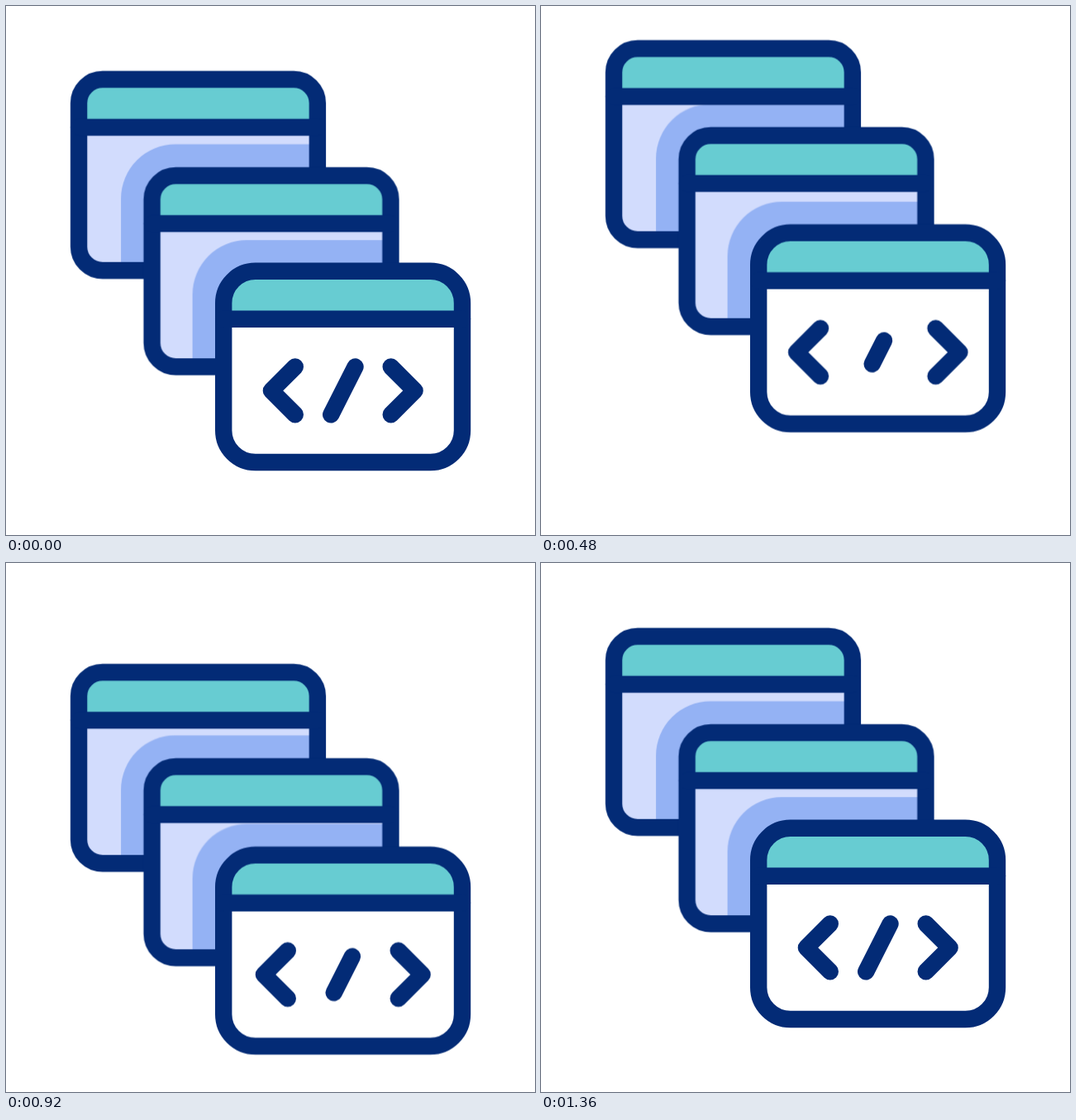
Animation, 640 px wide and 640 px high, one loop 1400 ms. Source, as an HTML page:

```html
<!DOCTYPE html>
<html lang="en">
<head>
<meta charset="utf-8">
<title>Code windows</title>
<style>
  html, body { margin: 0; width: 100%; height: 100%; overflow: hidden; background: #fff; }
  svg { display: block; width: 100vw; height: 100vh; }

  .line { fill: none; stroke: #032b76; stroke-width: 20.4; stroke-linecap: round; stroke-linejoin: round; }
  .head { fill: #67ccd2; }
  .body { fill: #d2dcfd; }
  .shade { fill: #94b2f4; }
  .white { fill: #fff; }

  .bob, .left, .right, .slash {
    animation: bob 1400ms cubic-bezier(.5, 0, .5, 1) infinite;
  }
  /* each window follows the one in front 80 ms later */
  .front { --up: -64px; --down: 43.5px; }
  .mid   { --up: -50px; --down: 43.5px; animation-delay: -1320ms; }
  .back  { --up: -38px; --down: 43.5px; animation-delay: -1240ms; }
  /* cancel the parent's motion so a shadow follows the window in front */
  .undo.mid  { --up: 50px; --down: -43.5px; }
  .undo.back { --up: 38px; --down: -43.5px; }

  .left  { --out: -13.8px; animation-name: spread; }
  .right { --out: 13.8px; animation-name: spread; }
  .slash { stroke-dasharray: 1 3; animation-name: trim; }

  @keyframes bob {
    0%, 2.143% { transform: translateY(0); }
    25.714% { transform: translateY(var(--up)); }
    54.286% { transform: translateY(var(--down)); }
    85.714%, 100% { transform: translateY(0); }
  }
  @keyframes spread {
    0%, 2.857% { transform: translateX(0); }
    47.143% { transform: translateX(var(--out)); }
    91.429%, 100% { transform: translateX(0); }
  }
  @keyframes trim {
    0%, 27.143% { stroke-dasharray: 1 3; stroke-dashoffset: 0; visibility: visible; }
    41.429%, 55.714% { stroke-dasharray: 0 3; stroke-dashoffset: -.5; visibility: hidden; }
    71.429%, 100% { stroke-dasharray: 1 3; stroke-dashoffset: 0; visibility: visible; }
  }
</style>
</head>
<body>
<svg viewBox="0 0 640 640">
  <defs>
    <rect id="card" width="288.8" height="231.2" rx="28.8"/>
    <rect id="cardFront" width="288.8" height="231.2" rx="38.6"/>
    <clipPath id="inside"><use href="#card"/></clipPath>
    <clipPath id="insideFront"><use href="#cardFront"/></clipPath>
    <path id="shadow" d="M50 420V144.500a66 66 0 0 1 66-66H300V420z"/>
    <rect id="bar" width="288.8" height="58"/>
    <path id="rule" d="M0 58H288.800"/>
  </defs>

  <g class="bob back">
    <g transform="translate(88.1 88.7)">
      <g clip-path="url(#inside)">
        <use href="#card" class="body"/>
        <g class="bob back undo"><g class="bob mid">
          <use href="#shadow" x="1" class="shade"/>
        </g></g>
        <use href="#bar" class="head"/>
      </g>
      <use href="#card" class="line"/>
      <use href="#rule" class="line"/>
    </g>
  </g>

  <g class="bob mid">
    <g transform="translate(176.6 205.2)">
      <g clip-path="url(#inside)">
        <use href="#card" class="body"/>
        <g class="bob mid undo"><g class="bob front">
          <use href="#shadow" x="-1" y="-.5" class="shade"/>
        </g></g>
        <use href="#bar" class="head"/>
      </g>
      <use href="#card" class="line"/>
      <use href="#rule" class="line"/>
    </g>
  </g>

  <g class="bob front">
    <g transform="translate(263.2 320.8)">
      <g clip-path="url(#insideFront)">
        <use href="#cardFront" class="white"/>
        <use href="#bar" class="head"/>
      </g>
      <use href="#cardFront" class="line"/>
      <use href="#rule" class="line"/>
    </g>
    <g class="line">
      <path class="left" d="M349.800 436.500l-28.900 28.900 28.900 28.900"/>
      <path class="slash" pathLength="1" d="M422.500 436.500L393.200 494.300"/>
      <path class="right" d="M465.700 436.500l28.900 28.900-28.900 28.900"/>
    </g>
  </g>
</svg>
</body>
</html>
```
